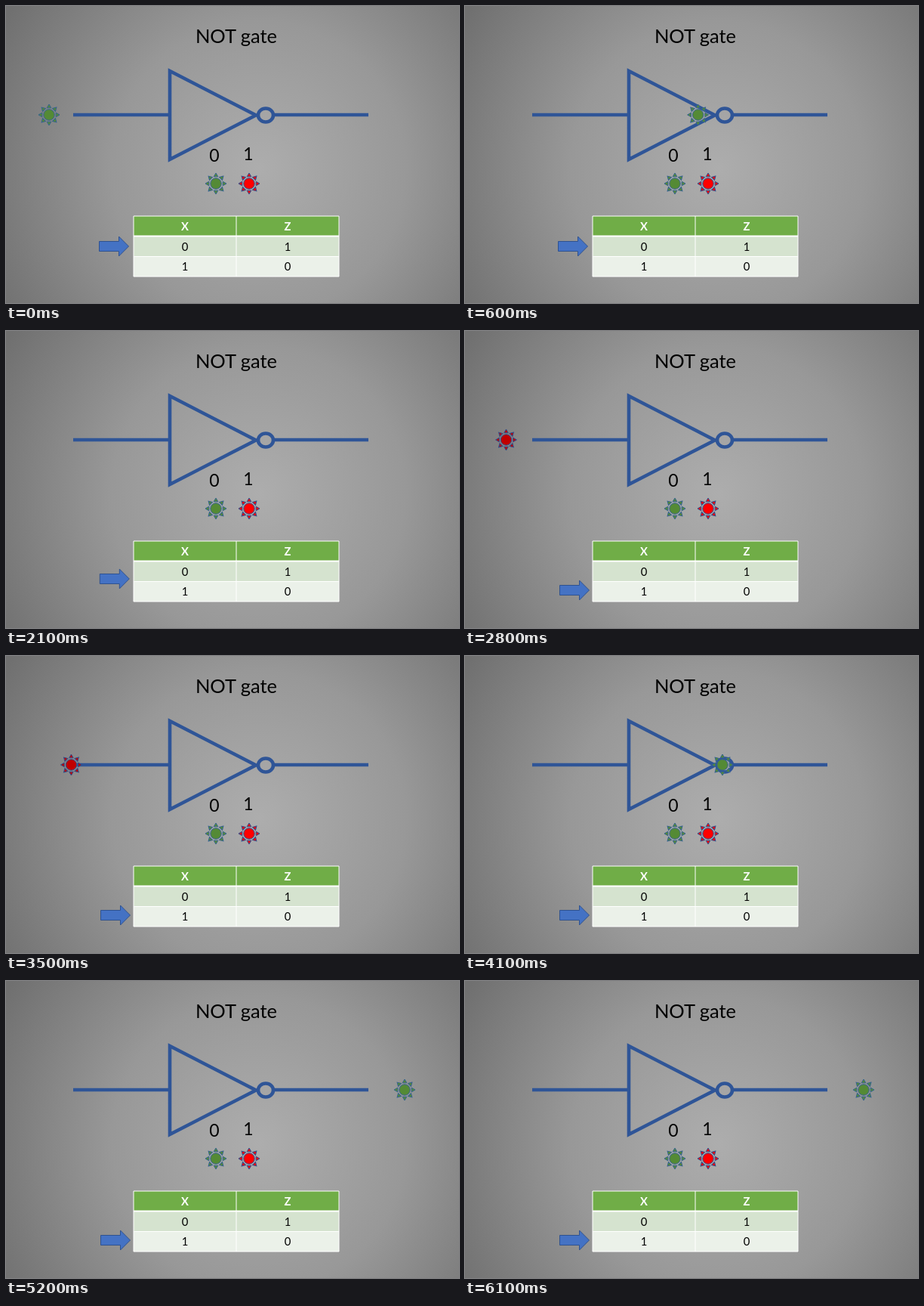
Recreate the animation shown at these times as an HTML page. Size 600 by 393 pixels, loop 6.2 s.

```html
<!DOCTYPE html>
<html lang="en">
<head>
<meta charset="utf-8">
<title>NOT gate</title>
<style>
  html, body { margin: 0; width: 100%; height: 100%; overflow: hidden; }
  svg { display: block; width: 100vw; height: 100vh; }
  text { font-family: Lato, Calibri, sans-serif; text-anchor: middle; }
  .label { font-size: 23px; }
  .cell { font-size: 14.8px; }
  .head { font-size: 14.8px; font-weight: bold; fill: #fff; }
  .wire { fill: none; stroke: #2f5597; stroke-width: 4.6; }
  .green { fill: #548a35; stroke: #36648f; }
  .red { fill: #f00; stroke: #2f528f; }
  .dark { fill: #c00000; stroke: #2f528f; }
</style>
</head>
<body>
<svg viewBox="0 0 600 393" preserveAspectRatio="none">
  <defs>
    <radialGradient id="bg" gradientUnits="userSpaceOnUse" cx="335" cy="215" r="390">
      <stop offset="0" stop-color="#adadad"/>
      <stop offset=".5" stop-color="#989898"/>
      <stop offset="1" stop-color="#707070"/>
    </radialGradient>
    <path id="ray" d="M14 0L9.2 -2.8V2.8Z"/>
    <g id="sun"><circle r="7.2"/></g>
  </defs>
  <rect width="600" height="393" fill="url(#bg)"/>
  <text x="305" y="49" font-size="25.5">NOT gate</text>

  <g class="wire">
    <path d="M89 144H217M355 144H480M217 86V203L331 144.5Z"/>
    <ellipse cx="344" cy="144.5" rx="10" ry="9"/>
  </g>

  <text class="label" x="276" y="206">0</text>
  <text class="label" x="321" y="204">1</text>
  <use href="#sun" class="green" x="278" y="235"/>
  <use href="#sun" class="red" x="322" y="235"/>

  <path fill="#70ad47" d="M169 278H441V304H169Z"/>
  <path fill="#d5e3cf" d="M169 304H441V331H169Z"/>
  <path fill="#ebf1e9" d="M169 331H441V358H169Z"/>
  <path fill="none" stroke="#fff" d="M169 278H441V358H169ZM305 278V358M169 331.5H441"/>
  <path stroke="#fff" stroke-width="2" d="M169 304.5H441"/>
  <text class="head" x="237" y="297">X</text>
  <text class="head" x="373" y="297">Z</text>
  <text class="cell" x="237" y="323.5">0</text>
  <text class="cell" x="373" y="323.5">1</text>
  <text class="cell" x="237" y="350">1</text>
  <text class="cell" x="373" y="350">0</text>

  <path id="arrow" fill="#4472c4" stroke="#2f528f" d="M123.5 311.5H149.5V305L162.5 318L149.5 331V324.5H123.5Z"/>
  <use id="signal" href="#sun"/>
</svg>
<script>
const LOOP = 6200, STEP = 100, TRAVEL = 750;
const GATE = 341, EXIT = 528;

// Each signal shows from `show` to `hide` and starts travelling at `go`.
const signals = [
  { color: 'green', from: 57, to: GATE, show: 0, go: 29, hide: 779 },
  { color: 'red', from: GATE, to: EXIT, show: 779, go: 1005, hide: 1760 },
  { color: 'dark', from: 54.5, to: GATE, show: 2515, go: 3323, hide: 4073 },
  { color: 'green', from: GATE, to: EXIT, show: 4073, go: 4351, hide: LOOP }
];
const ARROW_GO = 1765;

const arrow = document.getElementById('arrow');
const signal = document.getElementById('signal');
const sun = document.getElementById('sun');

for (let angle = 0; angle < 360; angle += 45) {
  const ray = document.createElementNS('http://www.w3.org/2000/svg', 'use');
  ray.setAttribute('href', '#ray');
  ray.setAttribute('transform', `rotate(${angle})`);
  sun.append(ray);
}

function progress(time, start) {
  const u = Math.min(1, Math.max(0, (time - start) / TRAVEL));
  return u < 0.5 ? 2 * u * u : 1 - 2 * (1 - u) ** 2;
}

function draw(now) {
  const time = Math.floor((now % LOOP) / STEP) * STEP;
  const shift = progress(time, ARROW_GO);
  arrow.setAttribute('transform', `translate(${2 * shift} ${25 * shift})`);

  const active = signals.find(s => time >= s.show && time < s.hide);
  signal.style.display = active ? '' : 'none';
  if (active) {
    const x = active.from + (active.to - active.from) * progress(time, active.go);
    signal.setAttribute('class', active.color);
    signal.setAttribute('transform', `translate(${x} 144)`);
  }
}

function tick() {
  draw(performance.now());
  requestAnimationFrame(tick);
}
tick();
</script>
</body>
</html>
```
